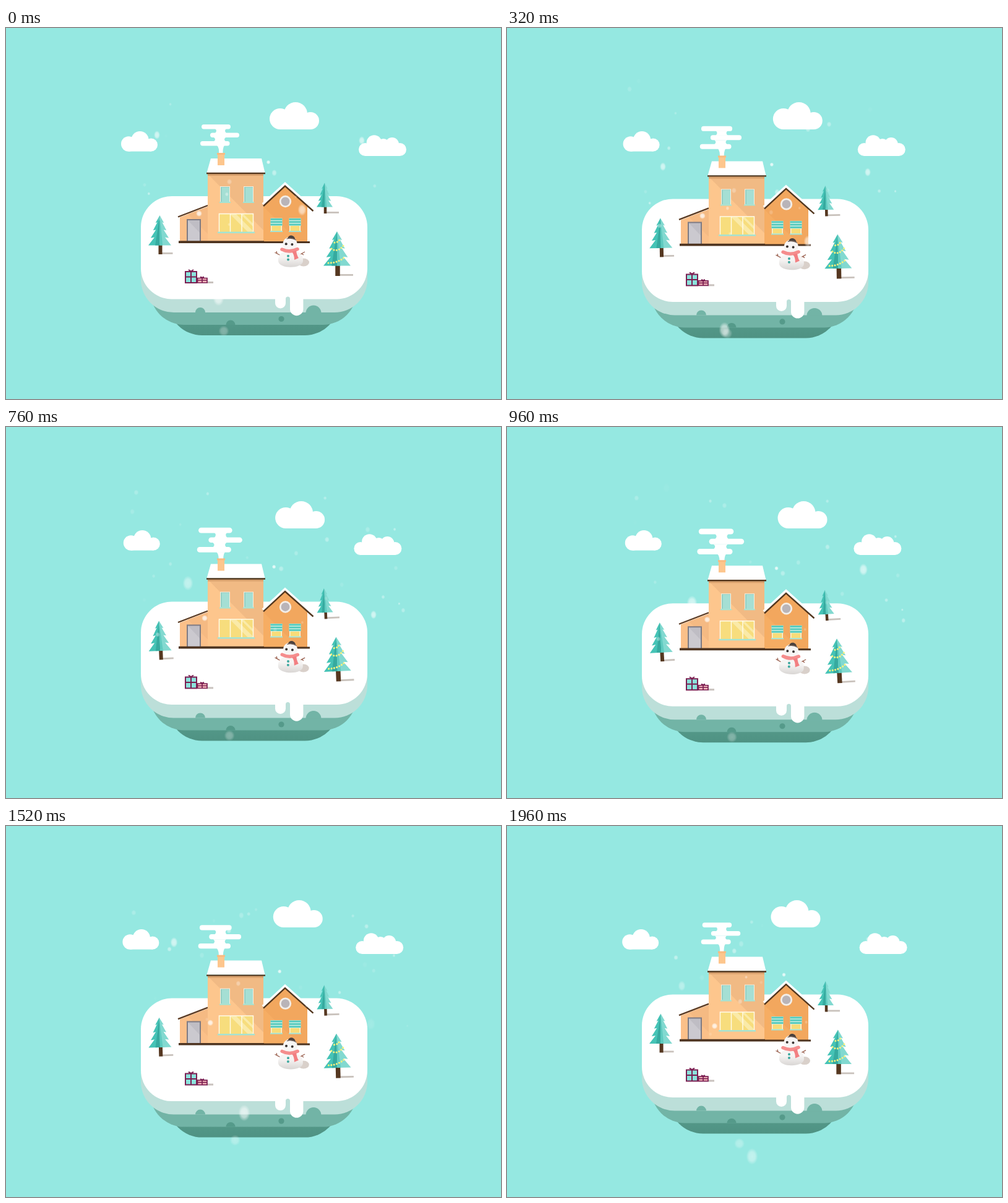
Write an HTML page that moves like this. It is 800 px wide and 600 px high and loops after 2000 ms.

```html
<!DOCTYPE html>
<html lang="en">
<head>
<meta charset="utf-8">
<title>Winter island</title>
<style>
html, body { margin: 0; width: 100%; height: 100%; overflow: hidden; background: #95e8e1; }
svg { display: block; width: 800px; height: 600px; }
</style>
</head>
<body>
<svg viewBox="0 0 800 600">
  <defs>
    <radialGradient id="flake">
      <stop offset="0" stop-color="#fff"/>
      <stop offset=".55" stop-color="#fff" stop-opacity=".85"/>
      <stop offset="1" stop-color="#fff" stop-opacity="0"/>
    </radialGradient>
    <linearGradient id="rock" x1="0" y1="0" x2="0" y2="1">
      <stop offset=".75" stop-color="#559a8a"/>
      <stop offset="1" stop-color="#4f9283"/>
    </linearGradient>
    <linearGradient id="snowBody" x1="0" y1="0" x2="0" y2="1">
      <stop offset=".4" stop-color="#f6f4f3"/>
      <stop offset="1" stop-color="#d9d6d4"/>
    </linearGradient>
  </defs>

  <g fill="#fff">
    <g id="cloudLeft">
      <circle cx="198.2" cy="187.5" r="12.2"/><circle cx="216.5" cy="181" r="14"/><circle cx="234.5" cy="189" r="10.5"/>
      <rect x="198" y="184" width="37" height="15.6"/>
    </g>
    <g id="cloudMid">
      <circle cx="443" cy="147" r="17"/><circle cx="468" cy="139" r="19"/><circle cx="492" cy="150" r="14"/>
      <rect x="443" y="142" width="49" height="22"/>
    </g>
    <g id="cloudRight">
      <circle cx="580.5" cy="196.5" r="10.5"/><circle cx="595" cy="185.5" r="12.3"/><circle cx="610" cy="189" r="10"/>
      <circle cx="624" cy="188" r="11"/><circle cx="636.5" cy="196.5" r="10.5"/>
      <rect x="580" y="188" width="57" height="19"/>
    </g>
    <g id="smoke">
      <rect x="316" y="156" width="47" height="7.5" rx="3.7"/>
      <rect x="330" y="169.5" width="47" height="7.5" rx="3.7"/>
      <rect x="314" y="183" width="47.5" height="7.5" rx="3.7"/>
      <path d="M338 163Q342 166 338 170H356Q352 166 356 163ZM336 177Q340 180 336 183.5H355Q351 180 355 177ZM341 190Q345 193 344 206H350.5Q350 193 353 190Z"/>
    </g>
  </g>

  <g id="island">
    <rect x="262" y="385" width="276" height="112" rx="55" fill="url(#rock)"/>
    <rect x="233" y="365" width="334" height="115" rx="55" fill="#72b4a6"/>
    <path d="M355.5 480a7.5 7.5 0 0 1 15 0z" fill="#559a8a"/>
    <circle cx="445" cy="470.5" r="4.6" fill="#559a8a"/>
    <rect x="218" y="294" width="366" height="166" rx="53" fill="#bcdfd9"/>
    <path d="M306 460a8 8 0 0 1 16 0zM484.5 461a12.5 12.5 0 0 1 25 0z" fill="#72b4a6"/>
    <rect x="218" y="272" width="366" height="166.5" rx="50" fill="#fff"/>
    <path d="M452 440V438a3.500 3.500 0 0 1 7 0V440z" fill="#bcdfd9"/>
    <path d="M435 437V445a8.5 8.5 0 0 0 17 0V437zM459 437V454.500a10.700 10.700 0 0 0 21.400 0V437z" fill="#fff"/>

    <g id="house">
      <path d="M281 306 326 289V345H281z" fill="#fbc089"/>
      <path d="M294 301 326 289V333z" fill="#f5ba83"/>
      <path d="M278 303.5 326 284.5" stroke="#fff" stroke-width="3"/>
      <path d="M278 305.5 326 287" stroke="#5a3a22" stroke-width="2.3"/>
      <path d="M293 345V310H314V345" fill="#bfbdc4" stroke="#7f7b83" stroke-width="2"/>
      <path d="M294 311 313 331V344H294z" fill="#cbc9cf"/>

      <path d="M326 235H416V345H326z" fill="#fdc68d"/>
      <path d="M326 236H416V327z" fill="#f1ba84"/>
      <path d="M326 236.5H416V239H326z" fill="#d8a06c"/>
      <path d="M331 211H413L418.5 234H324.5z" fill="#fff"/>
      <path d="M324 233.8H419V236.2H324z" fill="#53371f"/>
      <path d="M342 203H353V222H342z" fill="#fdc68d"/>
      <path d="M341 202H354V205H341z" fill="#f9bb80"/>
      <g id="panes"></g>
      <path d="M344.500 300.500H399.500V330H344.500z" fill="#f7dd7d"/>
      <path d="M362 301H372L399 328V330H391zM379 301H384L399 316V321z" fill="#faeaa8"/>
      <path d="M344.500 330V300.500H399.500V330M362.500 300V330M381 300V330" fill="none" stroke="#fffbe8" stroke-width="1.5"/>
      <path d="M342 329.500H402V332H342z" fill="#a4e3d2"/>

      <path d="M416 289 451 256 487 289V346H416z" fill="#f6ad63"/>
      <path d="M451 256 487 289V346H473L416 289z" fill="#f2a75e"/>
      <path d="M415 285 451 251.8 497 293" fill="none" stroke="#fff" stroke-width="4"/>
      <path d="M416 288 451 255.5 496.5 296" fill="none" stroke="#53371f" stroke-width="2.4"/>
      <circle cx="451.5" cy="280.5" r="8.300" fill="#b9b4b8" stroke="#f3eee8" stroke-width="2.8"/>
      <g id="shutters"></g>
      <path d="M279 344.300H417V345H491V348H279z" fill="#4e3420"/>
    </g>

    <g id="gifts">
      <path d="M325 410H335V413H325z" fill="#c9c2be"/>
      <g stroke="#7b1f52" stroke-width="2">
        <path d="M290 394H308V412H290zM299 394V412M290 402.5H308" fill="#8be3dc"/>
        <path d="M309.500 404.500H325V412H309.500zM317 404V412M309 408H325" fill="#f7babd" stroke-width="1.7"/>
        <path d="M299 393.5 295 391M299 393.5 303 391M317 404 314 402.5M317 404 320 402.5" fill="none"/>
      </g>
    </g>
    <g id="trees"></g>

    <g id="snowman">
      <ellipse cx="481" cy="379" rx="9" ry="6.5" fill="#d9d0ca"/>
      <path d="M446 369 434.5 363M438 365 437 361M472 368 483 362M478 365 481 367" stroke="#9a604e" stroke-width="1.3"/>
      <path d="M440 377C439 366 447 360 460 360S481 366 480 377C479 390 441 390 440 377z" fill="url(#snowBody)"/>
      <circle cx="459" cy="349.5" r="11.5" fill="#f7f5f4"/>
      <path d="M455 341C456 333.5 466 333.5 467.5 342Q461 339 455 341z" fill="#4b413d"/>
      <path d="M453.5 341Q461 338.5 469 343" fill="none" stroke="#76655e" stroke-width="1.3"/>
      <circle cx="452.7" cy="349.2" r="2" fill="#3a3432"/><circle cx="462.4" cy="350" r="2" fill="#3a3432"/>
      <path d="M446 358Q458 364 471 357.5" fill="none" stroke="#f58d8d" stroke-width="5.5" stroke-linecap="round"/>
      <path d="M462 362 469 360Q470 368 473 372L466 375Q466 366 462 362z" fill="#f27f82"/>
      <circle cx="456" cy="368.7" r="2" fill="#3fa9a0"/><circle cx="456" cy="374.5" r="2" fill="#3fa9a0"/>
    </g>
  </g>
  <g id="snow" fill="url(#flake)"></g>
</svg>
<script>
const LOOP = 2000, STEP = 40;
const byId = id => document.getElementById(id);

function add(parent, tag, attrs) {
  const el = document.createElementNS("http://www.w3.org/2000/svg", tag);
  for (const key in attrs) el.setAttribute(key, attrs[key]);
  parent.appendChild(el);
  return el;
}
const box = (parent, x, y, width, height, fill) => add(parent, "rect", { x, y, width, height, fill });

for (const x of [346, 384]) {
  const g = byId("panes");
  box(g, x, 256, 16, 26, "#f5efe0");
  box(g, x + 1, 257, 14, 24, "#94cfc3");
  box(g, x + 3, 258, 12, 23, "#a5dfd4");
  box(g, x - 1, 281, 18, 2, "#a4e3d2");
}
for (const x of [428, 458]) {
  const g = byId("shutters");
  box(g, x, 308, 18, 21, "#fbf3da");
  box(g, x + 1.5, 320, 15, 8, "#f8dc78");
  box(g, x - .5, 307.5, 19, 12.5, "#c9efe4");
  for (let i = 0; i < 3; i++) box(g, x - .5, 308 + i * 4.3, 19, 2.8, "#55cabd");
  box(g, x - 1, 328, 20, 2, "#a4e3d2");
}

// Half of a four-tiered fir silhouette; side is -1 or 1.
function firSide(x, top, half, height, side) {
  let d = `M${x} ${top}`;
  for (let i = 1; i <= 4; i++) {
    const reach = side * half * (.16 + .21 * i), y = top + height * i / 4;
    d += `L${x + reach} ${y}`;
    if (i < 4) d += `L${x + reach * .58} ${y - 1}`;
  }
  return d + `L${x} ${top + height}z`;
}

function makeTree(x, top, half, height, trunk, foot, shadow) {
  const g = add(byId("trees"), "g", {});
  const base = top + height;
  const shape = (d, fill) => add(g, "path", { d, fill });
  box(g, x + 1, foot - 3, shadow, 2.8, "#c9c2bc");
  box(g, x + 1 - trunk / 2, base - 1, trunk, foot - base + 1, "#553720");
  shape(firSide(x, top, half, height, -1), "#45c3b6");
  shape(firSide(x, top, half, height, 1), "#82d9d0");
  shape(`M${x} ${top}V${base}H${x - half * .4}z`, "#36aa9f");
  shape(`M${x} ${top}L${x + half * .25} ${base}H${x}z`, "#5fcbc0");
  return { g, x, y: (top + foot) / 2 };
}
const trees = [
  makeTree(248.5, 303, 18.5, 48.5, 6, 366, 20),
  makeTree(515, 250.5, 13, 39, 4.5, 300, 22),
  makeTree(535, 329, 22, 55.5, 7.5, 401, 25)
];
add(trees[2].g, "path", {
  d: "M521 380Q537 380 548 370M526 357Q536 364 546 351M531 347Q537 347 540 341",
  fill: "none", stroke: "#fbf27d", "stroke-width": 3.1, "stroke-linecap": "round", "stroke-dasharray": "0 4.4"
});

let seed = 41;
const rand = (lo, hi) => {
  seed = (seed * 16807) % 2147483647;
  return lo + (hi - lo) * seed / 2147483647;
};

// A flake passes (x, y) at second `at` and is visible for `life` seconds around it.
const flakes = [];
function addFlake(at, x, y, r, vx, vy, life, alpha) {
  const el = add(byId("snow"), "ellipse", { rx: r, ry: r * (1 + vy / 400) });
  flakes.push({ el, at, x, y, vx, vy, life, alpha });
}

// Near flakes: three hovering ones, then falling ones.
for (const [x, y, r] of [[352, 490, 8.5], [312, 300, 5], [424, 217, 3.3]])
  addFlake(0, x, y, r, 12, 12, 9, r > 6 ? .3 : .8);
for (const [at, x, y, r] of [
  [.1, 346, 453, 9], [.1, 481, 310, 7], [.4, 585, 246, 5], [.4, 254, 237, 5],
  [1, 577, 237, 7], [1.2, 305, 323, 8.5], [1.5, 271, 185, 6], [1.52, 385, 464, 9.5]
]) addFlake(at, x, y, r, 25, 160, 1.1, .6);

// Faint flakes in the distance.
for (let i = 0; i < 45; i++) {
  const r = rand(2, 4.3);
  addFlake(rand(0, 2), rand(190, 645), rand(110, 330), r, rand(-6, 22), r * rand(8, 25), rand(.8, 1.6), rand(.12, .45));
}

const move = (el, value) => el.setAttribute("transform", value);

function drawFlake(f, seconds) {
  const dt = seconds - f.at;
  const fade = Math.max(0, Math.min(1, (f.life / 2 - Math.abs(dt)) / .15));
  f.el.setAttribute("opacity", f.alpha * fade);
  f.el.setAttribute("cx", f.x + f.vx * dt);
  f.el.setAttribute("cy", f.y + f.vy * dt);
}

function draw(ms) {
  const k = 1 - Math.abs(ms / 1000 - 1);
  const lift = 13.8 * k, scale = 1 + .21 * k;
  move(byId("island"), `translate(0 ${lift})`);
  move(byId("cloudLeft"), `translate(${5 * k})`);
  move(byId("cloudMid"), `translate(${12 * k})`);
  move(byId("cloudRight"), `translate(${-10 * k})`);
  move(byId("smoke"), `translate(346.7 ${179.5 + lift}) scale(${scale}) translate(-346.7 -179.5)`);
  move(byId("snowman"), `rotate(${2 * k} 460 368)`);
  for (const { g, x, y } of trees) move(g, `rotate(${-3.2 * k} ${x} ${y})`);
  for (const f of flakes) drawFlake(f, ms / 1000);
}

const start = performance.now();
function tick() {
  const ms = (performance.now() - start) % LOOP;
  draw(Math.floor(ms / STEP) * STEP);
  requestAnimationFrame(tick);
}
tick();
</script>
</body>
</html>
```
